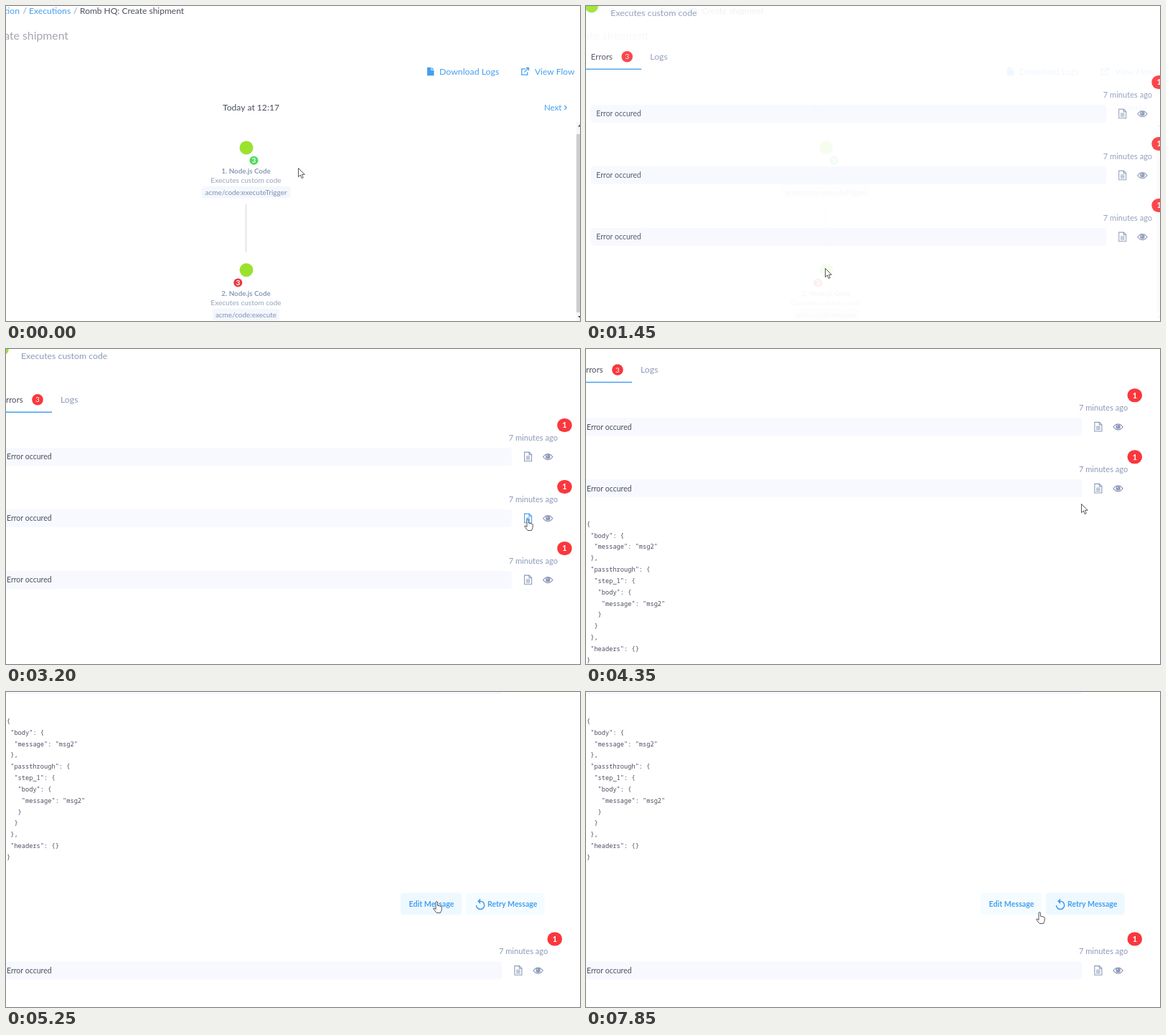
Animation of 800x440 px, one loop 8000 ms. Source, as an HTML page with a canvas:

```html
<!DOCTYPE html>
<html lang="en">
<head>
<meta charset="utf-8">
<title>Execution errors</title>
<style>
html, body { margin: 0; width: 100%; height: 100%; overflow: hidden; background: #fff; }
canvas { display: block; }
</style>
</head>
<body>
<canvas id="stage" width="800" height="440"></canvas>
<script>
const ctx = document.getElementById('stage').getContext('2d');
const LOOP = 8000, FRAME = 50;
const BLUE = '#469fee', SLATE = '#8c9ab8', DARK = '#4a4f60', RED = '#fa373d', LIME = '#9be22f', PALE = '#f7f9fe';
const SANS = 'Lato, "Open Sans", sans-serif';
const MONO = '"Noto Sans Mono", "DejaVu Sans Mono", monospace';

const JSON_LINES = JSON.stringify({
  body: { message: 'msg2' },
  passthrough: { step_1: { body: { message: 'msg2' } } },
  headers: {}
}, null, 1).split('\n');

const ARROW = new Path2D('M.5.5V12.7L3.3 10 5.2 14.6 7.2 13.7 5.3 9.3H9.2Z');
const HAND = new Path2D('M4 10V1.8a1.2 1.2 0 0 1 2.4 0V6.2l4.6 1q1.5.4 1.4 2l-.5 4-1.4 3.3H5.2L.9 11.2q-.6-1.4 1-1.3L4 11.6Z');
const EYE = new Path2D('M0 4.6Q3 .6 6.6 .6T13.2 4.6Q10.2 8.6 6.6 8.6T0 4.6Z');
const DOC = new Path2D('M.6.6H7.2L10.6 4V13.2H.6ZM7 .6V4.2H10.6M2.8 6.5H8.4M2.8 8.6H8.4M2.8 10.7H8.4');
const FILE = new Path2D('M0 0H5.5V4H9.5V11.5H0ZM6.4 0 9.5 3.1H6.4Z');
const LINK = new Path2D('M6 2H.8V10.4H8.8V6.5M4.2 6.8 10.2.9M6.8.7H10.5V4.4');
const CHEVRON = new Path2D('M0 0 3 3 0 6');
const RETRY_ARC = new Path2D('M6.4 4A5.6 5.6 0 1 1 .8 9.6');
const RETRY_HEAD = new Path2D('M6.4 0V8L2.4 4Z');

// time, x, y of the pointer's top left corner
const POINTER = [
  [300, 407, 226], [500, 424, 246], [950, 318, 364], [1150, 333, 366],
  [1600, 333, 366], [2000, 321, 322], [2100, 321, 322], [2650, 705, 222],
  [2750, 705, 222], [3000, 748, 235], [3200, 722, 237], [3900, 722, 237],
  [4200, 690, 216], [4750, 690, 216], [5200, 595, 292], [5300, 595, 292],
  [5600, 687, 291], [5750, 687, 291], [5870, 700, 300], [5950, 688, 305],
  [6550, 688, 305], [6600, 644, 304], [6700, 644, 304], [6950, 590, 305],
  [7100, 590, 305], [7250, 643, 304], [7350, 643, 304], [7550, 686, 298],
  [7700, 686, 298], [7850, 627, 307]
];

const during = (t, from, to) => t >= from && t < to;
const ramp = (t, from, to) => Math.min(1, Math.max(0, (t - from) / (to - from)));
const smooth = u => u * u * (3 - 2 * u);

function pointerAt(t) {
  const next = POINTER.findIndex(key => key[0] > t);
  if (next < 0) return POINTER.at(-1).slice(1);
  if (next === 0) return POINTER[0].slice(1);
  const [t0, x0, y0] = POINTER[next - 1], [t1, x1, y1] = POINTER[next];
  const u = smooth(ramp(t, t0, t1));
  return [x0 + (x1 - x0) * u, y0 + (y1 - y0) * u];
}

// cy is the middle of the capital letters
function text(str, x, cy, size, color, { align = 'left', weight = 400, family = SANS } = {}) {
  ctx.font = `${weight} ${size}px ${family}`;
  ctx.textAlign = align;
  ctx.fillStyle = color;
  ctx.fillText(str, x, cy + size * 0.36);
}

function box(x, y, w, h, color, radius = 0) {
  ctx.fillStyle = color;
  ctx.beginPath();
  ctx.roundRect(x, y, w, h, radius);
  ctx.fill();
}

function disc(x, y, r, color) {
  box(x - r, y - r, 2 * r, 2 * r, color, r);
}

function icon(path, x, y, { fill, stroke, width = 1 }) {
  ctx.save();
  ctx.translate(x, y);
  if (fill) { ctx.fillStyle = fill; ctx.fill(path); }
  if (stroke) { ctx.strokeStyle = stroke; ctx.lineWidth = width; ctx.stroke(path); }
  ctx.restore();
}

function badge(str, x, y, w, h, color, size, weight = 700) {
  box(x - w / 2, y - h / 2, w, h, color, h / 2);
  text(str, x, y, size, '#fff', { align: 'center', weight });
}

function drawNode(y, title, path, pillWidth, badgeX, badgeColor) {
  const center = { align: 'center' };
  disc(335, y, 9.5, LIME);
  badge('3', badgeX, y + 17.7, 12, 12, badgeColor, 10);
  text(title, 334.5, y + 32.3, 9.8, SLATE, { align: 'center', weight: 700 });
  text('Executes custom code', 334.5, y + 45.3, 10.05, '#98a4bb', center);
  box(334.5 - pillWidth / 2, y + 54, pillWidth, 16.5, '#f4f7fd', 4);
  text(path, 334.5, y + 62.5, 9.98, '#8290b0', center);
}

function drawFlow() {
  text('Integration', 19, 6.5, 12.15, BLUE, { align: 'right' });
  text('/', 23.5, 6.5, 12.15, SLATE);
  text('Executions', 32, 6.5, 12.15, BLUE);
  text('/', 94, 6.5, 12.15, SLATE);
  text('Romb HQ: Create shipment', 103, 6.5, 12, DARK);
  text('Create shipment', 87, 41.5, 15.8, '#a3a7b0', { align: 'right' });

  icon(FILE, 587, 85.7, { fill: BLUE });
  text('Download Logs', 604, 91.5, 12.3, BLUE);
  icon(LINK, 718, 85.8, { stroke: BLUE, width: 1.3 });
  text('View Flow', 737, 91.5, 12, BLUE);
  text('Today at 12:17', 302, 141.5, 12.1, DARK);
  text('Next', 750, 141.5, 11.5, BLUE);
  icon(CHEVRON, 778.3, 139, { stroke: BLUE, width: 1.2 });

  drawNode(198, '1. Node.js Code', 'acme/code:executeTrigger', 124, 345.5, '#4bdc58');
  box(334, 277, 1, 67, '#d6d7db');
  drawNode(368.7, '2. Node.js Code', 'acme/code:execute', 94, 323.3, '#e93a40');

  box(795, 162, 5, 278, '#f6f6f6');
  box(795, 179, 5, 249, '#cdcdcd');
  icon(new Path2D('M0 3 3 0 6 3Z'), 797, 165.5, { fill: '#444' });
  icon(new Path2D('M0 0H6L3 3Z'), 797, 433, { fill: '#444' });
}

function drawEye(x, y, color) {
  icon(EYE, x, y, { fill: '#fff', stroke: color, width: 1.2 });
  disc(x + 6.6, y + 4.3, 3.2, color);
  disc(x + 5.7, y + 3.2, 0.7, '#fff');
}

function drawRow(y, left, right, docColor = SLATE, eyeColor = SLATE) {
  badge('1', 778.5 + right, y + 106.5, 20.6, 19, RED, 10.8);
  text('7 minutes ago', 769 + right, y + 123.7, 11.1, SLATE, { align: 'right' });
  box(left - 6.5, y + 138, 711.5 + right - left, 25, PALE, 4);
  text('Error occured', left + 1, y + 150.5, 10.5, DARK);
  icon(DOC, 722 + right, y + 143.5, { stroke: docColor, width: 1.1 });
  drawEye(748.7 + right, y + 146, eyeColor);
}

function drawMessage(height, hovered) {
  ctx.save();
  ctx.beginPath();
  ctx.rect(0, 249, 800, height);
  ctx.clip();
  JSON_LINES.forEach((line, i) =>
    text(line, 1, 286.3 + i * 15.83, 8.68, DARK, { family: MONO }));

  const fill = name => name === hovered ? '#eef9ff' : '#f5fcff';
  box(550, 526, 85, 31, fill('edit'), 4);
  text('Edit Message', 561.5, 542, 10.7, BLUE, { weight: 700 });
  box(641, 526, 110, 31, fill('retry'), 4);
  icon(RETRY_ARC, 654.7, 533.8, { stroke: BLUE, width: 1.6 });
  icon(RETRY_HEAD, 654.7, 533.8, { fill: BLUE });
  text('Retry Message', 671, 542, 10.6, BLUE, { weight: 700 });
  ctx.restore();
}

function drawPanel(t, hidden) {
  const open = smooth(ramp(t, 3350, 3800));
  const left = 165 * hidden;
  const right = 250 * hidden - 13.7 * ramp(t, 3350, 3450);
  const hovered = during(t, 5150, 5450) || during(t, 6850, 7450) ? 'edit'
    : t >= 5450 ? 'retry' : '';

  ctx.save();
  ctx.globalAlpha = 1 - hidden;
  box(0, 0, 800, 440, '#fff');
  ctx.translate(0, -245.5 * smooth(ramp(t, 4208, 4750)));

  disc(left - 5.5, 0, 9.3, LIME);
  text('Executes custom code', left + 21, 9.5, 12.3, SLATE);
  text('Errors', left - 6.5, 70.7, 11.5, DARK);
  badge('3', left + 44, 70.7, 15.6, 15.6, RED, 10, 400);
  text('Logs', left + 76, 70.7, 12.3, SLATE);
  box(left - 20, 87.4, 84, 1.5, BLUE);

  drawRow(0, left, right);
  drawRow(86, left, right,
    during(t, 3100, 3950) ? BLUE : SLATE,
    during(t, 2950, 3100) ? BLUE : SLATE);
  if (open > 0) drawMessage(312 * open, hovered);
  drawRow(172 + 312 * open, left, right);
  ctx.restore();
}

function drawPointer(t) {
  const isHand = during(t, 1000, 1250) || during(t, 2900, 3950) || t >= 5050;
  icon(isHand ? HAND : ARROW, ...pointerAt(t), { fill: '#fff', stroke: '#444', width: 0.9 });
}

function draw(now) {
  const t = Math.floor(now % LOOP / FRAME) * FRAME;
  const hidden = (1 - ramp(t, 1200, 1640)) ** 3;
  box(0, 0, 800, 440, '#fff');
  if (hidden > 0) drawFlow();
  if (hidden < 1) drawPanel(t, hidden);
  drawPointer(t);
}

const start = performance.now();
function tick() {
  draw(performance.now() - start);
  requestAnimationFrame(tick);
}
tick();
</script>
</body>
</html>
```
